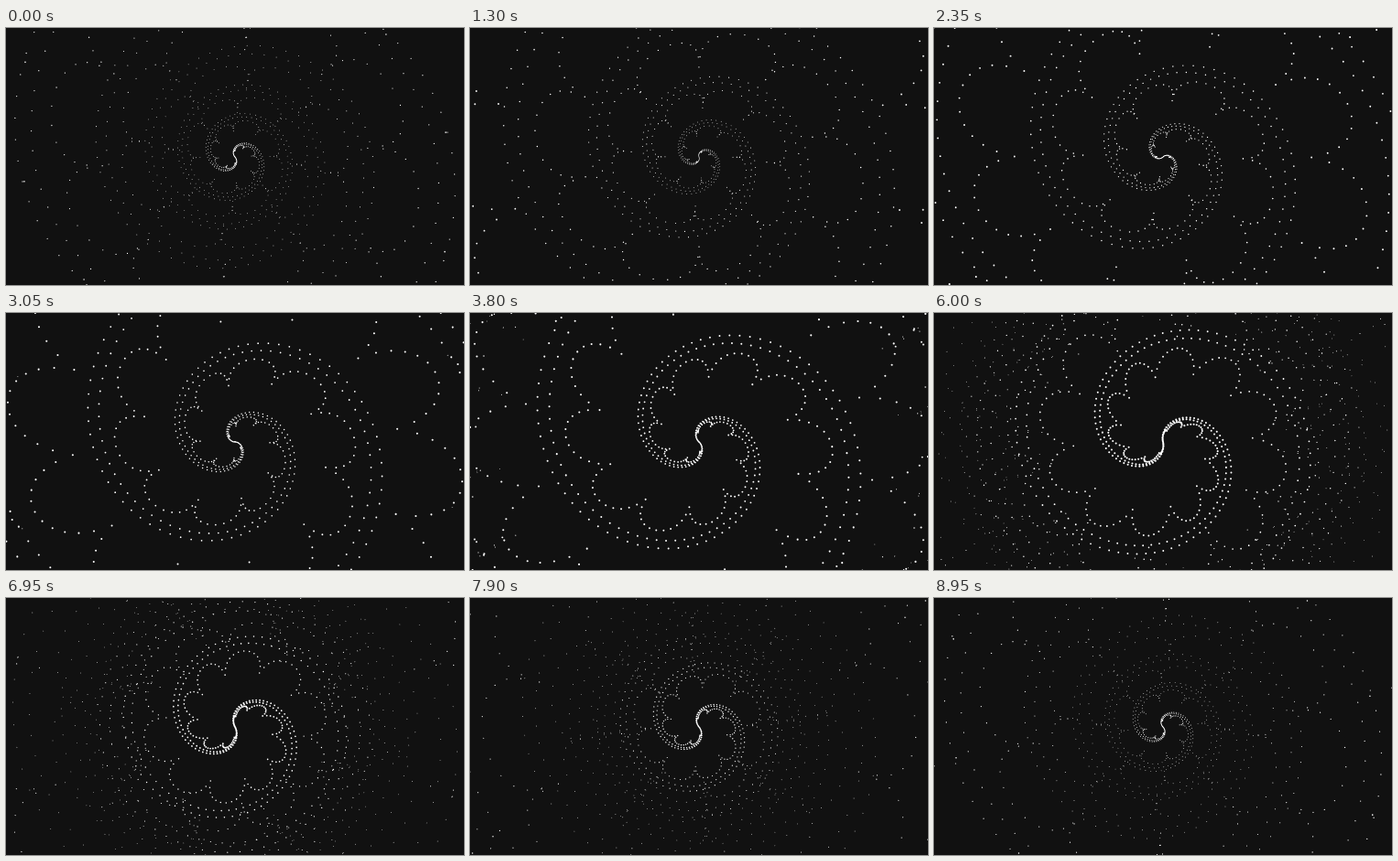
Write an HTML page with a canvas that moves like this. It is 500 px wide and 281 px high and loops after 9 s.

```html
<!DOCTYPE html>
<html lang="en">
<head>
<meta charset="utf-8">
<title>Breathing spiral</title>
<style>
  html, body { margin: 0; width: 100%; height: 100%; overflow: hidden; background: #111; }
  canvas { display: block; width: 100vw; height: 100vh; }
</style>
</head>
<body>
<canvas id="stage"></canvas>
<script>
const W = 500, H = 281, LOOP = 9, STEP = 0.05;
const PETALS = 46, PETAL_DOTS = 12, RIM_DOTS = 7;
const OMEGA = 2 * Math.PI / LOOP, RAD = Math.PI / 180;

const canvas = document.getElementById('stage');
const ctx = canvas.getContext('2d');

// Overall turn in degrees: half a revolution per loop, slow at first.
const turnKeys = [[0, 112], [1.3, 104], [2.35, 123], [3.8, 162], [6, 231], [7.9, 280], [8.95, 289.5]];

function turnKey(i) {
  const n = turnKeys.length, lap = Math.floor(i / n);
  const [t, a] = turnKeys[i - lap * n];
  return [t + lap * LOOP, a + lap * 180];
}

function turnSlope(i) {
  const [t0, a0] = turnKey(i - 1), [t1, a1] = turnKey(i + 1);
  return (a1 - a0) / (t1 - t0);
}

function turn(t) {
  let i = 0;
  while (turnKey(i + 1)[0] <= t) i++;
  const [t0, a0] = turnKey(i), [t1, a1] = turnKey(i + 1);
  const d = t1 - t0, u = (t - t0) / d, v = 1 - u;
  return a0 * v * v * (1 + 2 * u) + a1 * u * u * (3 - 2 * u)
    + d * u * v * (turnSlope(i) * v - turnSlope(i + 1) * u);
}

// Both waves travel from the outside in.
const zoom = (n, t) => 9.2 + 3.8 * Math.cos(OMEGA * (t - 5.8 + 0.155 * n));
const wavePhase = (n, t) => OMEGA * (t - 2.1 + 0.2 * n);
const angle = (n, t) => 40.5 * n - 0.125 * n * n + 64.5 * Math.sin(wavePhase(n, t));

function dotPair(n, reach, t, spin) {
  const s = zoom(n, t), r = n * s * reach;
  if (r > 300) return;
  const a = (angle(n, t) + spin) * RAD;
  const x = r * Math.cos(a), y = r * Math.sin(a), size = 0.082 * s;
  for (const side of [1, -1]) {
    ctx.moveTo(W / 2 + side * x + size, 141 + side * y);
    ctx.arc(W / 2 + side * x, 141 + side * y, size, 0, 2 * Math.PI);
  }
}

function draw(t) {
  const k = canvas.width / W;
  ctx.setTransform(k, 0, 0, canvas.height / H, 0, 0);
  ctx.fillStyle = '#111';
  ctx.fillRect(0, 0, W, H);
  ctx.fillStyle = '#fff';
  ctx.beginPath();
  const spin = turn(t);
  for (let p = 0; p < PETALS; p++) {
    const curl = 0.65 + 0.5 * Math.cos(wavePhase(p, t));
    for (let j = 0; j < PETAL_DOTS; j++) {
      const u = j / PETAL_DOTS;
      const n = p + u - curl * Math.sin(2 * Math.PI * u) / (2 * Math.PI);
      dotPair(n, 1 + 0.36 * Math.sin(Math.PI * u) ** 0.85, t, spin);
    }
    for (let j = 0; j < RIM_DOTS; j++) {
      const n = p + j / RIM_DOTS;
      dotPair(n, 1.5, t, spin);
      dotPair(n + 0.5 / RIM_DOTS, 1.62, t, spin);
    }
  }
  ctx.fill();
}

function resize() {
  const ratio = window.devicePixelRatio || 1;
  canvas.width = Math.round(innerWidth * ratio);
  canvas.height = Math.round(innerHeight * ratio);
}

function frame() {
  const t = (performance.now() / 1000) % LOOP;
  draw(Math.floor(t / STEP + 1e-6) * STEP);
  requestAnimationFrame(frame);
}

addEventListener('resize', resize);
resize();
frame();
</script>
</body>
</html>
```
